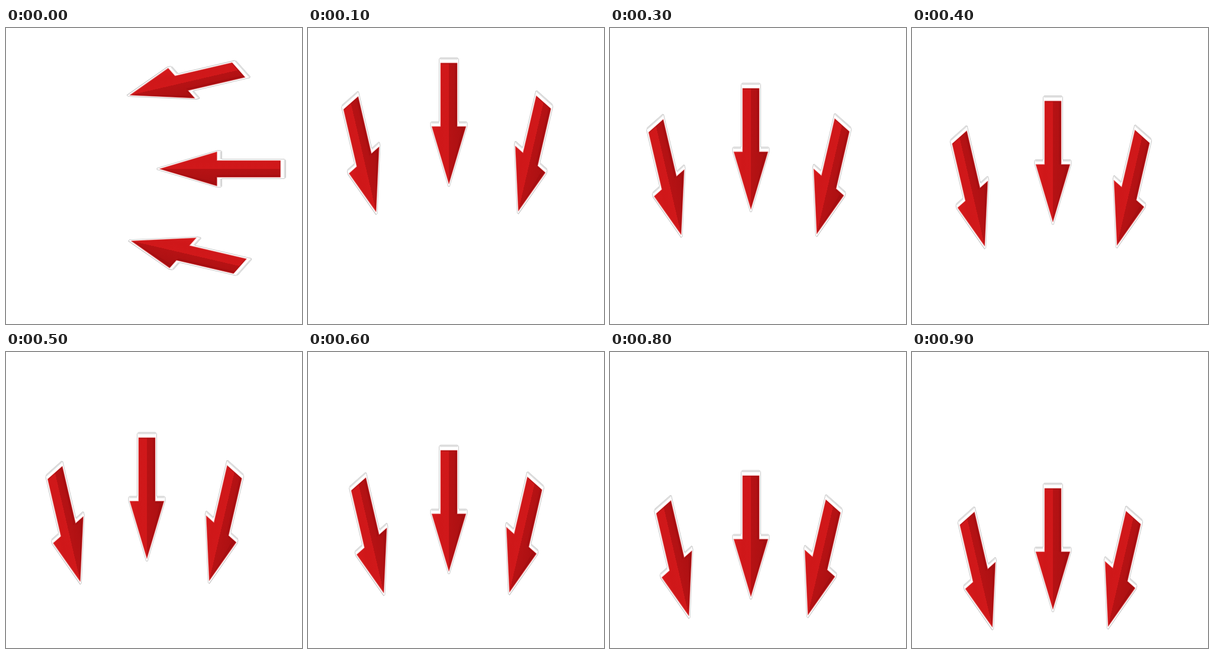
An HTML page that plays this animation: 500x500 px, repeating every 1000 ms.

```html
<!DOCTYPE html>
<html>
<head>
<meta charset="utf-8">
<style>
  html, body { margin: 0; height: 100%; overflow: hidden; background: #fff; }
  svg { display: block; width: 100%; height: 100%; }
</style>
</head>
<body>
<svg viewBox="0 0 500 500">
  <defs>
    <linearGradient id="red" gradientUnits="userSpaceOnUse" x1="-29" x2="29" y1="0" y2="0">
      <stop offset="0" stop-color="#d6191b"/>
      <stop offset=".26" stop-color="#cf1719"/>
      <stop offset=".5" stop-color="#d1181a"/>
      <stop offset=".5" stop-color="#b61214"/>
      <stop offset=".74" stop-color="#b01113"/>
      <stop offset="1" stop-color="#a90f11"/>
    </linearGradient>
    <!-- Points down, tip of the red part at the origin -->
    <g id="arrow" stroke-linejoin="round">
      <path d="M-14.5-213H14.5L16.5-210.5V-105H29.5L31-103V-97L1.2 4.5H-1.2L-31-97V-103L-29.5-105H-16.5V-210.5Z"
            fill="#fff" stroke="#c2c2c2" stroke-width=".9"/>
      <path d="M-15-211.3H15M-29.5-103.3H-16.5M16.5-103.3H29.5" stroke="#dedede" stroke-width="2.6"/>
      <path d="M-14-204H14V-96.8H28.8L0 0L-28.8-96.8H-14Z"
            fill="url(#red)" stroke="#e0484a" stroke-opacity=".5" stroke-width="1.3"/>
      <path d="M14-96.8H28L0-2L22-93H14V-203H10V-96.8Z" fill="#8f0a0c" opacity=".28"/>
      <path d="M-13-203H13" stroke="#a00e10" stroke-width="1.5" opacity=".6"/>
    </g>
  </defs>
  <use href="#arrow"/>
  <use href="#arrow"/>
  <use href="#arrow"/>
</svg>
<script>
const arrows = document.querySelectorAll("svg > use");

// Slanted axes, tip while pointing left, first tip while pointing down, move per step
const poses = [
  { axes: [.88, -.78, .209, .9], side: [209.3, 113.5], down: [115, 310.3], move: [2.6, 19.3] },
  { axes: [1, 0, 0, 1], side: [259.5, 238], down: [238, 263.2], move: [0, 21.4] },
  { axes: [.88, .78, -.209, .9], side: [211.7, 359.7], down: [355.3, 309], move: [-3, 19.3] }
];

function draw(now) {
  const step = Math.floor(now / 100) % 10;
  poses.forEach(({ axes, side, down, move }, i) => {
    const [a, b, c, d] = axes;
    const matrix = step
      ? [a, b, c, d, ...down.map((p, j) => p + move[j] * (step - 1))]
      : [-b, a, -d, c, ...side];
    arrows[i].setAttribute("transform", `matrix(${matrix})`);
  });
}

let start;
function tick(now) {
  start ??= now;
  draw(now - start);
  requestAnimationFrame(tick);
}
draw(0);
requestAnimationFrame(tick);
</script>
</body>
</html>
```
